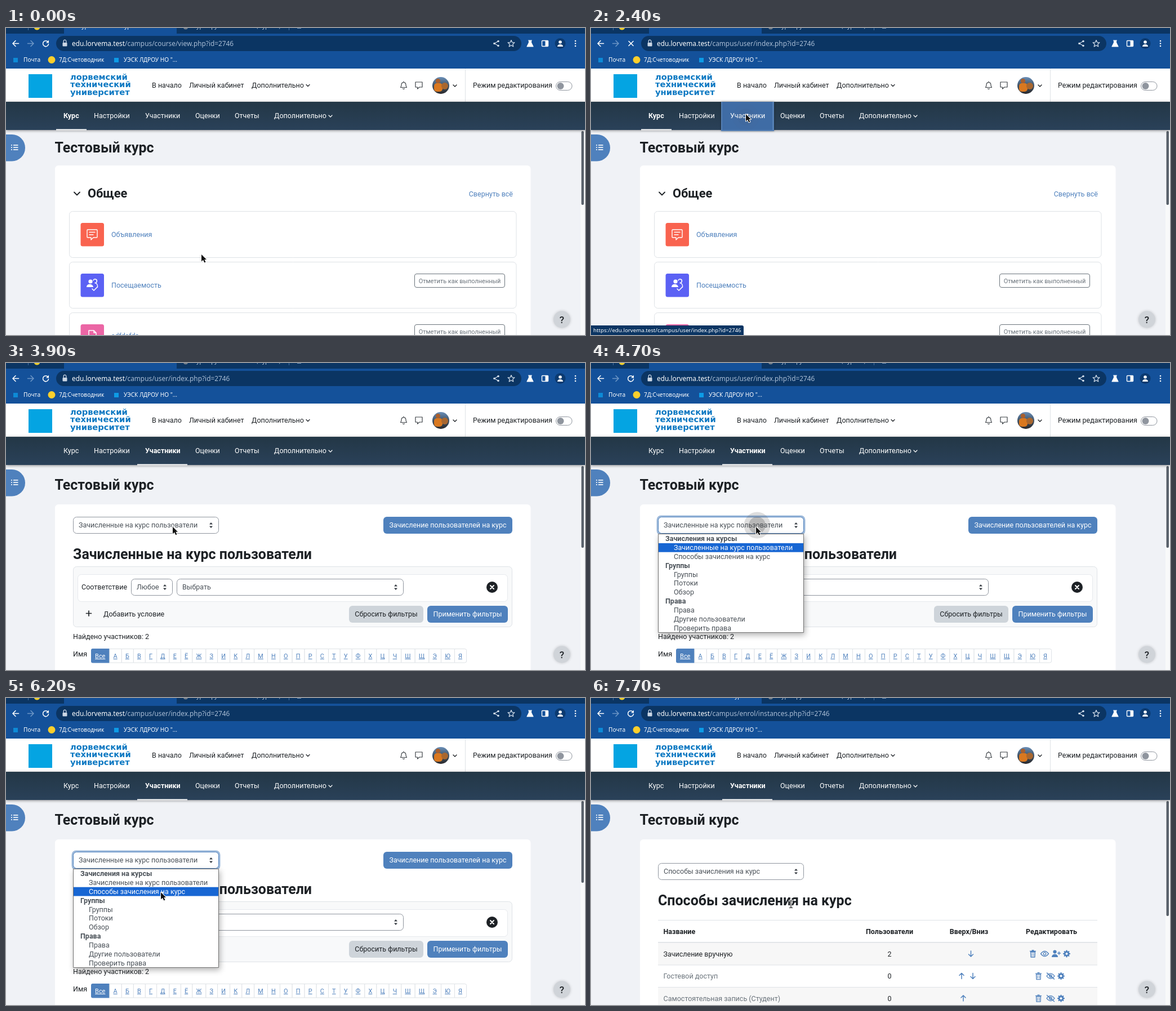
Write an HTML page with a canvas that moves like this. It is 1028 px wide and 545 px high and loops after 8 s.

```html
<!DOCTYPE html>
<html lang="ru">
<head>
<meta charset="utf-8">
<title>Курс</title>
<style>
html, body { margin: 0; width: 100%; height: 100%; overflow: hidden; background: #f0f2f6; }
canvas { display: block; width: 100vw; height: 100vh; }
</style>
</head>
<body>
<canvas id="stage" width="1028" height="545"></canvas>
<script>
const ctx = document.getElementById('stage').getContext('2d');
const LOOP = 8000, STEP = 100;
const CLICK = 1400, LOADING = 1700, NEW_URL = 2200, MEMBERS = 2600;
const FOCUS = 4300, OPEN = 4400, CHOSEN = 6600, METHODS = 6800;

const BAR = '#14519a', BAR_DARK = '#0b3563', BLUE = '#4f81bd', INK = '#1d2125';
const GRAY = '#6a737b', LINE = '#dee2e6', FIELD = '#495057';
const UI = '"Noto Sans", sans-serif', PAGE = 'Roboto, sans-serif';
const HOST = 'edu.lorvema.test', BASE = '/campus/';
const URLS = ['course/view.php', 'user/index.php', 'enrol/instances.php'].map(p => BASE + p + '?id=2746');
const TITLES = ['Курс: Тестовый курс', 'Участники', 'Способы зачисления на курс'];
const METHOD = 'Способы зачисления на курс', ENROLLED = 'Зачисленные на курс пользователи';
const OPTIONS = ['#Зачисления на курсы', ENROLLED, METHOD, '#Группы', 'Группы', 'Потоки', 'Обзор',
  '#Права', 'Права', 'Другие пользователи', 'Проверить права'];

// time, x, y of the pointer tip
const PATH = [
  [200, 347, 402], [600, 320, 298], [1000, 276, 151], [1100, 276, 151], [1200, 305, 164],
  [1300, 305, 164], [1400, 275, 153], [2500, 275, 153], [3000, 279, 170], [3400, 290, 282],
  [3700, 302, 290], [4000, 293, 291], [4700, 293, 291], [5500, 296, 345], [6200, 275, 345],
  [7000, 275, 345], [7700, 355, 366]
];

function pointer(t) {
  if (t <= PATH[0][0]) return PATH[0].slice(1);
  for (let i = 1; i < PATH.length; i++) {
    const [t0, x0, y0] = PATH[i - 1], [t1, x1, y1] = PATH[i];
    if (t <= t1) {
      const k = (t - t0) / (t1 - t0);
      return [x0 + (x1 - x0) * k, y0 + (y1 - y0) * k];
    }
  }
  return PATH[PATH.length - 1].slice(1);
}

function text(s, x, y, size = 12.5, color = INK, weight = 400, align = 'left', family = PAGE) {
  ctx.font = `${weight} ${size}px ${family}`;
  ctx.textAlign = align;
  ctx.fillStyle = color;
  ctx.fillText(s, x, y);
  return ctx.measureText(s).width;
}

function rect(x, y, w, h, color) {
  ctx.fillStyle = color;
  ctx.fillRect(x, y, w, h);
}

function box(x, y, w, h, r, fill, stroke, lw = 1) {
  ctx.beginPath();
  ctx.roundRect(x, y, w, h, r);
  if (fill) { ctx.fillStyle = fill; ctx.fill(); }
  if (stroke) { ctx.strokeStyle = stroke; ctx.lineWidth = lw; ctx.stroke(); }
}

function disc(x, y, r, color) {
  ctx.beginPath();
  ctx.arc(x, y, r, 0, 7);
  ctx.fillStyle = color;
  ctx.fill();
}

function icon(d, x, y, stroke, lw = 1.5, fill) {
  const p = new Path2D(d);
  ctx.save();
  ctx.translate(x, y);
  ctx.lineCap = ctx.lineJoin = 'round';
  if (stroke) { ctx.strokeStyle = stroke; ctx.lineWidth = lw; ctx.stroke(p); }
  if (fill) { ctx.fillStyle = fill; ctx.fill(p); }
  ctx.restore();
}

const CHEVRON = 'M-3-1.5L0 1.5L3-1.5';
const CROSS = 'M-4-4L4 4M4-4L-4 4';
const UP = 'M0 5V-5M-4-1L0-5L4-1', DOWN = 'M0-5V5M-4 1L0 5L4 1';
const EYE = 'M-7 0Q0-9 7 0Q0 9-7 0ZM-2.3 0a2.3 2.3 0 1 0 4.6 0a2.3 2.3 0 1 0-4.6 0';

function browser(t) {
  const page = t < NEW_URL ? 0 : t < METHODS ? 1 : 2;
  rect(0, 0, 1028, 72, BAR);
  rect(0, 0, 103, 10, BAR_DARK);
  rect(303, 0, 725, 10, BAR_DARK);
  disc(55, -2, 5.5, '#f2cf2e');
  for (const x of [39, 502]) rect(x, 0, 1, 4, '#48719f');
  disc(319, -2, 4.5, '#747f8b');
  const busy = t >= LOADING && t < MEMBERS;
  if (!busy) text(TITLES[page], 128, 0, 10.1, '#fff', 400, 'left', UI);
  text('Курс: группы и списки (журнал)', 332, 0, 10.1, '#c3d0df', 400, 'left', UI);
  rect(517, 0, 7, 1, '#7f9abb');

  box(89, 14, 826, 27, 13.5, BAR_DARK);
  icon('M5.5 0H-5M0-5L-5 0L0 5', 17, 27.5, '#fff', 1.6);
  icon('M-5.5 0H5M0-5L5 0L0 5', 44, 27.5, '#6d96c6', 1.6);
  if (busy || (t >= CHOSEN && t < METHODS)) icon(CROSS, 71, 27.5, '#fff', 1.6);
  else {
    icon('M4.2-2.5A5 5 0 1 0 5 1', 70.5, 27.5, '#fff', 1.6);
    icon('M5.5-6V-1H.5Z', 70.5, 27.5, null, 0, '#fff');
  }
  box(100.5, 26, 8, 6.5, 1, '#cbd7e5');
  icon('M-2.3 0V-2.5a2.3 2.3 0 0 1 4.6 0V0', 104.5, 26, '#cbd7e5', 1.3);
  const w = text(HOST, 117, 31.5, 11.85, '#fff', 400, 'left', UI);
  text(URLS[page], 117 + w, 31.5, 11.85, '#a9bdd5', 400, 'left', UI);

  icon('M3.5-4L-3.5 0L3.5 4', 870.5, 27.5, '#d5e0ec', 1.1);
  for (const [x, y] of [[874, 23.5], [867, 27.5], [874, 31.5]]) disc(x, y, 1.8, '#d5e0ec');
  icon('M0-6L1.7-1.9L6-1.6L2.7 1.2L3.8 5.5L0 3.2L-3.8 5.5L-2.7 1.2L-6-1.6L-1.7-1.9Z', 897, 27.5, '#d5e0ec', 1.2);
  icon('M-3-6H3M-2-6V-2L-5.5 5H5.5L2-2V-6Z', 930.5, 28, '#fff', 1.2, '#fff');
  box(951.5, 22.5, 11, 10, 1, null, '#fff', 1.4);
  rect(957.5, 22.5, 5, 10, '#fff');
  disc(984, 27.5, 9.5, '#0b3a70');
  disc(984, 25, 2.8, '#fff');
  icon('M-5 5.5C-5 0 5 0 5 5.5Z', 984, 27.5, null, 0, '#fff');
  for (const y of [23, 27.5, 32]) disc(1011, y, 1.3, '#fff');

  rect(13, 53, 8, 8, '#0d8ad6');
  text('Почта', 31, 60, 10.1, '#fff', 400, 'left', UI);
  disc(81, 56.5, 6.5, '#fbcf2c');
  text('7Д:Счетоводник', 94, 60, 10.1, '#fff', 400, 'left', UI);
  rect(192, 53, 8, 8, '#0d9be6');
  text('УЭСК ЛДРОУ НО "...', 209, 60, 10.1, '#fff', 400, 'left', UI);
}

function avatar() {
  ctx.save();
  ctx.beginPath();
  ctx.arc(772, 102, 15, 0, 7);
  ctx.clip();
  const g = ctx.createLinearGradient(0, 87, 0, 117);
  g.addColorStop(0, '#6a8fb8');
  g.addColorStop(.5, '#3f5368');
  g.addColorStop(1, '#2b2a2c');
  rect(757, 87, 30, 30, g);
  disc(767, 94, 4, '#a85f2e');
  box(760, 98, 15, 15, 5, '#d97820');
  disc(779, 103, 6, '#a9672f');
  ctx.restore();
}

function header() {
  rect(0, 72, 1028, 59, '#fff');
  rect(40, 82, 42, 42, '#04a4e2');
  ['лорвемский', 'технический', 'университет'].forEach((s, i) =>
    text(s, 114, 91.5 + i * 13.5, 14.7, '#0b78c2', 700, 'left', '"DejaVu Sans", sans-serif'));
  text('В начало', 259, 106);
  text('Личный кабинет', 325, 106);
  text('Дополнительно', 436, 106);
  icon(CHEVRON, 536, 102, INK, 1.2);
  icon('M-5.5 3.5C-3.5 1-4-1-3.8-2.5C-3-6.5 3-6.5 3.8-2.5C4-1 3.5 1 5.5 3.5ZM-1.5 5.5Q0 7.5 1.5 5.5M0-5.5V-7', 706, 102, '#3b4045', 1.2);
  icon('M-6-5H6V4H1L-2.5 7V4H-6Z', 733, 101, '#3b4045', 1.2);
  avatar();
  icon(CHEVRON, 797, 102.5, INK, 1.4);
  rect(815, 72, 1, 59, LINE);
  text('Режим редактирования', 829, 106);
  box(976.5, 95.5, 28.5, 15, 7.5, '#fff', '#8f959e');
  disc(984.5, 103, 6, '#8f959e');
}

function nav(t, y) {
  const members = t >= MEMBERS;
  ctx.save();
  ctx.shadowColor = 'rgba(0,0,0,.45)';
  ctx.shadowBlur = 5;
  ctx.shadowOffsetY = 1;
  const g = ctx.createLinearGradient(0, 131, 0, 181);
  g.addColorStop(0, '#233746');
  g.addColorStop(1, '#2a4159');
  rect(0, 131, 1028, 50, g);
  ctx.restore();
  const over = t >= 800 && t < FOCUS && y < 181;
  if (over && t >= LOADING && !members) {
    ctx.save();
    ctx.shadowColor = 'rgba(0,0,0,.4)';
    ctx.shadowBlur = 3;
    rect(231, 131, 94, 52, '#5580b5');
    ctx.restore();
  }
  if (over) rect(233, 131, 89, 50, members ? '#2f4a70' : '#3f6ca5');
  rect(members ? 233 : 89, 179.5, members ? 89 : 54, 2, '#fff');
  const items = [['Курс', 102], ['Настройки', 156], ['Участники', 247], ['Оценки', 336], ['Отчеты', 406], ['Дополнительно', 476]];
  items.forEach(([s, x], i) => text(s, x, 160, 12.5, '#fff', i === (members ? 2 : 0) ? 700 : 400));
  icon(CHEVRON, 576, 156.5, '#fff', 1.2);
}

function course() {
  text('Тестовый курс', 86.5, 221, 24.96, INK, 700);
  box(87, 244, 844.5, 330, 6, '#fff');
  icon('M-5-2.5L0 2.5L5-2.5', 126, 294, INK, 1.8);
  text('Общее', 145, 300.5, 21.8, INK, 700);
  text('Свернуть всё', 900, 298.5, 12.5, BLUE, 400, 'right');
  const rows = [['Объявления', '#f9634f'], ['Посещаемость', '#5b61f4'], ['sdfdsfds', '#eb66a5']];
  rows.forEach(([name, color], i) => {
    const y = 325.5 + i * 90;
    box(112.5, y, 793.5, 82, 6, '#fff', LINE);
    box(132.5, y + 20.5, 41.5, 41.5, 3.5, color);
    text(name, 187, y + 45.5, 12.5, BLUE);
    if (!i) return;
    box(725.5, y + 21, 160, 24, 3.5, '#fff', '#6a737b');
    text('Отметить как выполненный', 805.5, y + 37, 10.95, GRAY, 400, 'center');
  });
  icon('M-8-8H8Q9-8 9-7V5Q9 6 8 6H2L-2 10V6H-8Q-9 6-9 5V-7Q-9-8-8-8ZM-5-3.5H5M-5 1H2', 153, 366, '#fff', 1.4);
  disc(150, 450, 3.6, '#fff');
  icon('M-9 5C-9-2 2-2 3 5Z', 152, 455, null, 0, '#fff');
  icon('M2-9a3.3 3.3 0 1 1 3 4.5C8-4 10-1 9.5 3', 153, 457, '#fff', 1.5);
  icon('M0 5L3 8L9 2', 153, 458, '#fff', 1.6);
  icon('M-6-9H3L7-5V9H-6ZM3-9V-5H7', 153, 546, '#fff', 1.5);
}

function select(label, x, y, w, focused) {
  if (focused) box(x - .5, y - .5, w + 1, 31, 6, null, 'rgba(79,129,189,.55)', 4);
  box(x + .5, y + .5, w - 1, 29, 6, '#fff', focused ? BLUE : '#8f959e');
  text(label, x + 10, y + 19.3, 12.5, FIELD);
  icon('M-3-1.5L0-5L3-1.5ZM-3 1.5L0 5L3 1.5Z', x + w - 14, y + 15, null, 0, '#343a40');
}

function button(label, x, y, w, fill, color) {
  box(x, y, w, 30, 6, fill);
  text(label, x + w / 2, y + 19.3, 12.5, color, 400, 'center');
}

function pageCard() {
  text('Тестовый курс', 86.5, 224.5, 24.96, INK, 700);
  box(87, 251, 844.5, 330, 6, '#fff');
}

function letters() {
  text('Имя', 119, 521);
  let x = 151;
  for (const s of ['Все', ...'АБВГДЕЁЖЗИКЛМНОПРСТУФХЦЧШЩЭЮЯ']) {
    ctx.font = '400 10.92px ' + PAGE;
    const tw = ctx.measureText(s).width, w = tw + 14.2, on = s.length > 1;
    if (on) box(x, 507, w, 25.5, [3, 0, 0, 3], BLUE);
    else box(x + .5, 507.5, w, 24.5, s === 'Я' ? [0, 3, 3, 0] : 0, '#fff', LINE);
    const color = on ? '#fff' : BLUE;
    text(s, x + w / 2, 523.5, 10.92, color, 400, 'center');
    rect(x + (w - tw) / 2, 525, tw, 1, color);
    x += w;
  }
}

function members(t) {
  pageCard();
  select(t < CHOSEN ? ENROLLED : METHOD, 119, 273, 259, t >= FOCUS);
  button('Зачисление пользователей на курс', 670, 273, 229, BLUE, '#fff');
  text(ENROLLED, 119, 347.5, 24.96, INK, 700);
  box(119.5, 361.5, 779, 107, 6, '#f8f9fa', LINE);
  box(127.5, 375.5, 763, 48, 6, '#fff', '#e6e9ed');
  text('Соответствие', 134, 402);
  select('Любое', 222, 383, 74);
  select('Выбрать', 303, 383, 403);
  disc(863, 398, 10, INK);
  icon('M-3-3L3 3M3-3L-3 3', 863, 398, '#fff', 2);
  icon('M-4.5 0H4.5M0-4.5V4.5', 147, 444.5, INK, 1.7);
  text('Добавить условие', 173, 450);
  button('Сбросить фильтры', 609, 431, 132, '#ced4da', INK);
  button('Применить фильтры', 748, 431, 143, BLUE, '#fff');
  text('Найдено участников: 2', 119, 489.5);
  letters();
}

function dropdown(picked) {
  ctx.save();
  ctx.shadowColor = 'rgba(0,0,0,.3)';
  ctx.shadowBlur = 10;
  ctx.shadowOffsetX = 2;
  ctx.shadowOffsetY = 4;
  rect(119, 303, 259, 176, '#fff');
  ctx.restore();
  box(119.5, 303.5, 258, 175, 0, '#fff', '#707070');
  OPTIONS.forEach((s, i) => {
    const y = 304 + i * 15.85, group = s[0] === '#';
    if (i === picked) rect(120, y, 257, 15.85, '#1766d3');
    text(group ? s.slice(1) : s, group ? 132 : 147, y + 12.2, 12.5,
      i === picked ? '#fff' : FIELD, group ? 700 : 400);
  });
}

function trash(x, y) {
  icon('M-5-4.5H5M-1.5-6H1.5M-4-3L-3.5 6H3.5L4-3Z', x, y, BLUE, 1.3);
  icon('M-1.5-1V4M1.5-1V4', x, y, BLUE, 1);
}

function gear(x, y) {
  for (let i = 0; i < 4; i++) {
    const a = i * Math.PI / 4, c = 5.3 * Math.cos(a), s = 5.3 * Math.sin(a);
    icon(`M${-c} ${-s}L${c} ${s}`, x, y, BLUE, 2.4);
  }
  disc(x, y, 4.7, BLUE);
  disc(x, y, 2, '#fff');
}

function methods() {
  pageCard();
  select(METHOD, 119, 293, 259);
  text(METHOD, 119, 367.5, 24.96, INK, 700);
  rect(119, 394, 780, 1, LINE);
  rect(119, 434, 780, 40, '#f7f7f7');
  rect(119, 433, 780, 1.6, LINE);
  rect(119, 473.5, 780, 1, LINE);
  rect(119, 513, 780, 32, '#f7f7f7');
  rect(119, 513, 780, 1, LINE);
  text('Название', 128.5, 418.5, 12.5, INK, 700);
  [['Пользователи', 530], ['Вверх/Вниз', 671], ['Редактировать', 817.5]].forEach(([s, x]) =>
    text(s, x, 418.5, 12.5, INK, 700, 'center'));
  ['Зачисление вручную', 'Гостевой доступ', 'Самостоятельная запись (Студент)'].forEach((s, i) => {
    const y = 454 + i * 39.6;
    text(s, 128.5, y + 4.5, 12.5, i ? GRAY : INK);
    text(i ? '0' : '2', 530, y + 4.5, 12.5, INK, 400, 'center');
    trash(i ? 794.5 : 784.5, y);
    icon(EYE, i ? 816 : 805.5, y, BLUE, 1.3);
    if (i) icon('M-6.5-5.5L6.5 5.5', 816, y, BLUE, 1.4);
    gear(i ? 834.5 : 844.5, y);
  });
  disc(823.5, 450.5, 3.1, BLUE);
  icon('M-5.5 6C-5.5-1 5.5-1 5.5 6Z', 823.5, 454, null, 0, BLUE);
  icon('M-2.5 0H2.5M0-2.5V2.5', 831, 453, BLUE, 1.4);
  icon(DOWN, 674.5, 454, BLUE);
  icon(UP, 658, 493.5, BLUE);
  icon(DOWN, 678, 493.5, BLUE);
  icon(UP, 661, 533, BLUE);
}

function sideParts(t) {
  box(0, 189, 34, 47.5, [0, 23.5, 23.5, 0], BLUE);
  for (const y of [208, 212, 216]) {
    rect(9, y - .8, 2, 1.6, '#fff');
    rect(13, y - .8, 8.5, 1.6, '#fff');
  }
  rect(1020, 182, 8, 363, '#f8f9fa');
  box(1021.5, 183, 4.5, t < MEMBERS ? 131 : t < METHODS ? 145 : 204, 2, '#59616b');
  ctx.save();
  ctx.shadowColor = 'rgba(0,0,0,.18)';
  ctx.shadowBlur = 5;
  disc(987, 517.5, 15, '#d0d4d9');
  ctx.restore();
  text('?', 987, 523.5, 17, INK, 500, 'center');
}

function halo(x, y, alpha) {
  if (alpha <= 0) return;
  ctx.globalAlpha = alpha;
  disc(x, y, 23.5, 'rgba(90,90,90,.2)');
  disc(x, y, 15, 'rgba(60,60,60,.24)');
  ctx.globalAlpha = 1;
}

function drawPointer(t, x, y) {
  const hand = y < 181 && ((t >= 800 && t < LOADING) || (t >= MEMBERS && t < 3300));
  if (t >= 7100) {
    const beam = 'M-2.5-6.5Q0-6.5 0-5Q0-6.5 2.5-6.5M0-5V5M-2.5 6.5Q0 6.5 0 5Q0 6.5 2.5 6.5';
    icon(beam, x, y, '#fff', 3);
    icon(beam, x, y, '#111', 1.1);
  } else if (hand) {
    icon('M-1.5 1Q0-1 1.5 1V4.5H6Q8 5 7.5 8L6.5 12H-1L-4 7.5Q-4 5.5-1.5 7Z', x, y, '#fff', 1.8, '#111');
  } else {
    icon('M0 0V12.5L3-.2L3 9.8L5.3 14.5L7.5 13.5L5.3 9H9Z', x, y, '#fff', 1.6);
    icon('M0 0V12.5L3 9.8L5.3 14.5L7.5 13.5L5.3 9H9Z', x, y, '#fff', 1.6, '#111');
  }
}

function draw(t) {
  const [x, y] = pointer(t);
  rect(0, 0, 1028, 545, '#f0f2f6');
  if (t < MEMBERS) course();
  else if (t < METHODS) members(t);
  else methods();
  sideParts(t);
  browser(t);
  header();
  nav(t, y);
  if (t >= OPEN && t < CHOSEN) dropdown(y > 336 ? 2 : 1);
  if (t >= 900 && t < MEMBERS) {
    box(0, 528, 271, 17, [0, 3, 0, 0], BAR_DARK);
    text('https://' + HOST + URLS[1], 4, 540, 9.7, '#fff', 400, 'left', UI);
  }
  if (t >= CLICK && t < MEMBERS) halo(275, 158, Math.min(1, 1 - (t - LOADING) / 800));
  if (t >= FOCUS && t < 5300) halo(295, 288, Math.min(1, 1 - (t - 4700) / 600));
  drawPointer(t, x, y);
}

const start = performance.now();
function tick() {
  const t = (performance.now() - start) % LOOP;
  draw(Math.floor(t / STEP) * STEP);
  requestAnimationFrame(tick);
}
tick();
</script>
</body>
</html>
```
